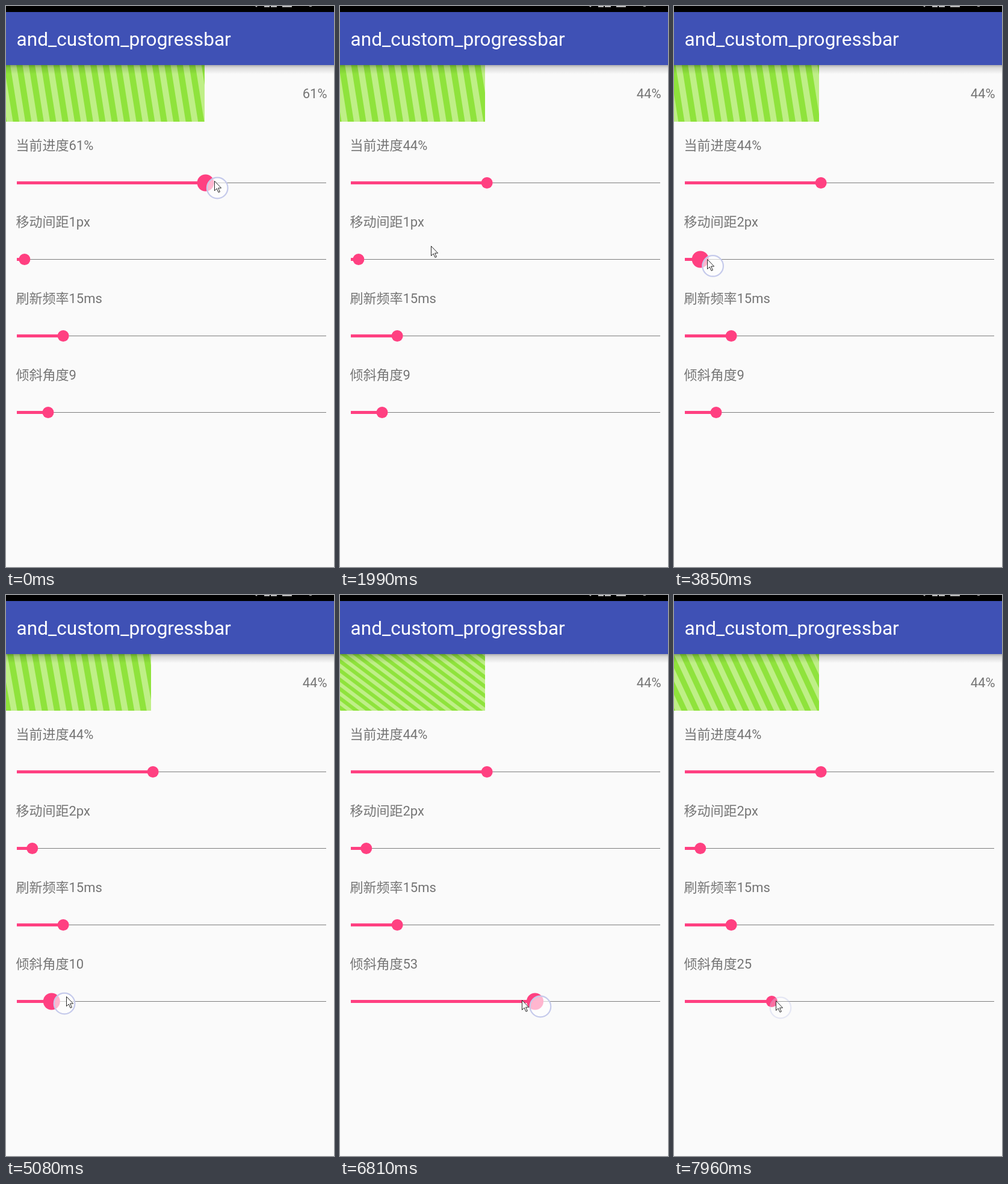
These frames come from a looping animation (545 px wide and 931 px high, 8000 ms). An HTML page:

```html
<!DOCTYPE html>
<html lang="zh-CN">
<head>
<meta charset="utf-8">
<title>and_custom_progressbar</title>
<style>
  html, body { margin: 0; width: 100%; height: 100%; overflow: hidden; background: #fafafa; }
  svg { display: block; }
  text { font-family: Roboto, "Noto Sans CJK SC", "Noto Sans CJK", sans-serif; font-size: 22px; fill: #757575; }
  .title { font-size: 31.6px; fill: #fff; }
  .accent { fill: #ff4081; }
</style>
</head>
<body>
<svg id="stage" width="545" height="931" viewBox="0 0 545 931">
  <defs>
    <linearGradient id="shade" x1="0" y1="0" x2="0" y2="1">
      <stop offset="0" stop-color="#000" stop-opacity=".3"/>
      <stop offset=".3" stop-color="#000" stop-opacity=".13"/>
      <stop offset="1" stop-color="#000" stop-opacity="0"/>
    </linearGradient>
  </defs>
  <rect width="545" height="931" fill="#fafafa"/>
  <svg id="bar" y="98" width="331" height="94">
    <rect width="545" height="94" fill="#8fe33c"/>
    <path id="stripes" fill="#bfef87"/>
  </svg>
  <rect y="98" width="545" height="15" fill="url(#shade)"/>
  <rect width="545" height="10"/>
  <path d="M414 0h4l-2 2zM429 0h9v2h-9zM440 0h10v2h-10zM459 0h16v2h-16zM504 0h4v1h-4z" fill="#bbb"/>
  <rect y="10" width="545" height="88" fill="#3f51b5"/>
  <text class="title" x="17.5" y="66">and_custom_progressbar</text>
  <text id="percent" x="533.5" y="153" text-anchor="end"></text>
  <g id="sliders"></g>
  <circle id="touch" r="17.3" fill="#fff" fill-opacity=".62" stroke="#c5caeb" stroke-width="2.2"/>
  <path id="cursor" d="M.5.5v16l3.7-3.5 2.8 6.3 2.4-1-2.8-6.2h5z" fill="#fff" stroke="#111" stroke-width=".9"/>
</svg>
<script>
const LOOP = 8000, STEP = 7960 / 60;
const LEFT = 18, SPAN = 514, PERIOD = 20.5, GRIP = 17, LAG = 66;
const $ = id => document.getElementById(id);

// Path of the finger: [time, x, y]
const PATH = [
  [-200, 342, 302], [800, 388, 302], [1060, 371, 302], [1600, 261, 302],
  [2140, 138, 432], [2420, 70, 470], [2920, 46, 429], [3250, 46, 431],
  [3700, 68, 431], [4050, 60, 432], [4380, 100, 624], [4750, 86, 677],
  [5041, 97, 678], [6470, 369, 681], [6766, 333, 683], [7000, 245, 685],
  [7690, 184, 685], [7960, 177, 685]
];

// "drag" is the time span in which the finger holds the thumb
const SLIDERS = [
  { name: "当前进度", unit: "%", max: 100, drag: [-200, 1600] },
  { name: "移动间距", unit: "px", max: 40, drag: [3350, 4050] },
  { name: "刷新频率", unit: "ms", max: 100, fixed: 15 },
  { name: "倾斜角度", unit: "", max: 89, drag: [4750, 7940], first: 9 }
];

function finger(t) {
  const n = PATH.findIndex(k => k[0] >= t);
  if (n < 1) return PATH.at(n).slice(1);
  const [t0, x0, y0] = PATH[n - 1], [t1, x1, y1] = PATH[n];
  const u = (t - t0) / (t1 - t0);
  return [x0 + (x1 - x0) * u, y0 + (y1 - y0) * u];
}

function valueAt({ max, drag, fixed }, t) {
  if (fixed) return fixed;
  const [x] = finger(Math.min(Math.max(t, drag[0]), drag[1]));
  return (x - GRIP - LEFT) * max / SPAN;
}

const isHeld = ({ drag }, t) => !!drag && t >= drag[0] && t < drag[1];

function add(parent, tag, attrs) {
  const el = document.createElementNS("http://www.w3.org/2000/svg", tag);
  for (const key in attrs) el.setAttribute(key, attrs[key]);
  return parent.appendChild(el);
}

SLIDERS.forEach((s, i) => {
  const y = 293.5 + i * 127, root = $("sliders");
  s.label = add(root, "text", { x: 16.5, y: y - 55 });
  add(root, "rect", { x: LEFT, y: y - 0.5, width: SPAN, height: 1, fill: "#7d7d7d" });
  s.fill = add(root, "rect", { class: "accent", x: LEFT, y: y - 2.5, height: 5 });
  s.thumb = add(root, "circle", { class: "accent", cy: y });
});

function drawSlider(s, t) {
  const value = Math.round(valueAt(s, t - LAG)), w = SPAN * value / s.max;
  s.label.textContent = s.name + value + s.unit;
  s.fill.setAttribute("width", w);
  s.thumb.setAttribute("cx", LEFT + w);
  s.thumb.setAttribute("r", isHeld(s, t) ? 14 : 9.5);
  return value;
}

function drawStripes(angle, shift) {
  const dx = 94 * Math.tan(angle * Math.PI / 180);
  const phase = (shift % PERIOD + PERIOD) % PERIOD;
  let d = "";
  for (let x = phase - PERIOD * Math.ceil(dx / PERIOD + 1); x < 420; x += PERIOD)
    d += `M${x} 0h${PERIOD / 2}l${dx} 94h${-PERIOD / 2}z`;
  $("stripes").setAttribute("d", d);
}

function draw(t) {
  const [progress, , , angle] = SLIDERS.map(s => drawSlider(s, t));
  $("percent").textContent = progress + "%";
  $("bar").setAttribute("width", Math.floor(5.65 * valueAt(SLIDERS[0], t - 200) - 7));
  // The stripes run twice as fast once the spacing is 2px
  drawStripes(angle, 7 - 0.0303 * (t + Math.max(0, t - 3490)));

  const [x, y] = finger(t), [ahead, tipY] = finger(t + 60);
  const held = SLIDERS.some(s => isHeld(s, t));
  const fading = SLIDERS.some(s => isHeld(s, t - 140));
  $("touch").setAttribute("transform", `translate(${x} ${y})`);
  $("touch").setAttribute("opacity", held ? 1 : fading ? 0.4 : 0);
  $("cursor").setAttribute("transform", `translate(${Math.round(ahead - 8)} ${Math.round(tipY - 12)})`);
}

const begin = performance.now();
function frame(now) {
  const t = Math.max(0, now - begin) % LOOP;
  draw(Math.floor((t + 2) / STEP) * STEP);
  requestAnimationFrame(frame);
}
draw(0);
requestAnimationFrame(frame);
</script>
</body>
</html>
```
